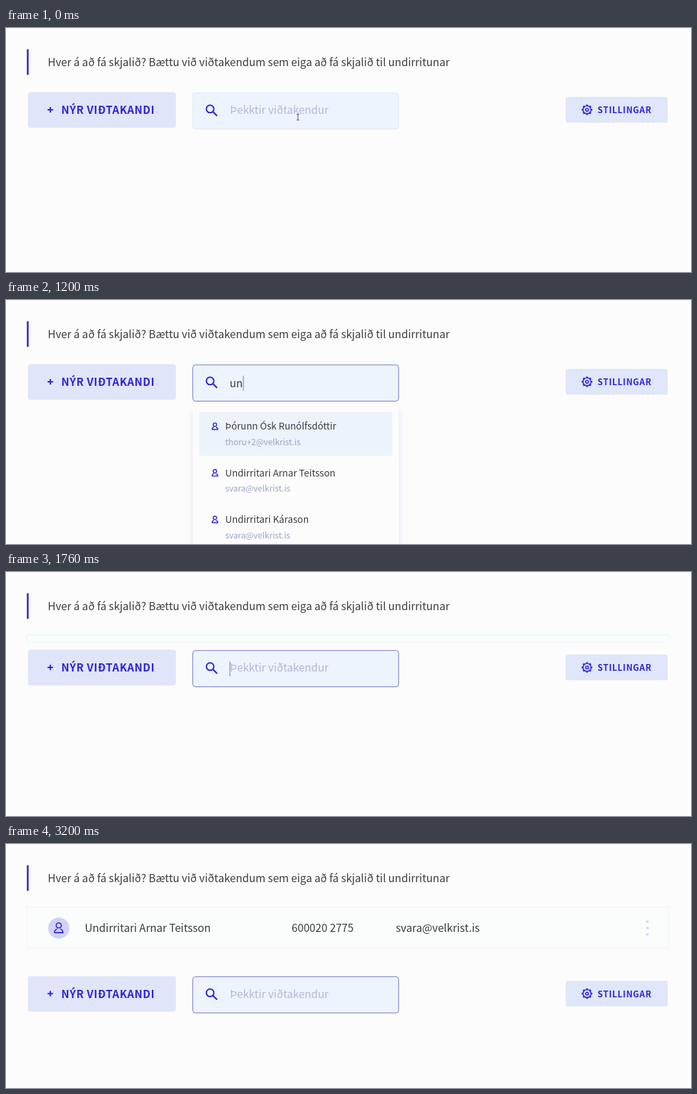
An HTML page for the animation above (3.52 s loop, 1000 px wide and 358 px high).

```html
<!DOCTYPE html>
<html lang="is">
<head>
<meta charset="utf-8">
<title>Viðtakendur</title>
<style>
  html, body { margin: 0; width: 100%; height: 100%; overflow: hidden; background: #fcfcfc; }
  svg { display: block; width: 100vw; height: 100vh; }
  text {
    font: 400 15.68px "Noto Sans CJK JP", "Noto Sans CJK SC", "Noto Sans CJK", "Noto Sans", sans-serif;
    fill: #3c3c40;
    white-space: pre;
  }
  .label { font-size: 15.5px; font-weight: 600; letter-spacing: .64px; fill: #2d22dc; }
  .label.small { font-size: 12.3px; letter-spacing: .73px; }
  .name { font-size: 13.72px; }
  .mail { font-size: 12.15px; fill: #9aa3c8; }
  .hit { font-weight: 700; }
  .line { fill: none; stroke: #2d22dc; }
  .panel { fill: #fcfcfc; filter: drop-shadow(0 5px 5px rgba(80, 100, 200, .17)); }

  /* One shared 3520 ms clock; all changes are hard except the row's fade. */
  .tools, .field, .beam, .hint, .q, .list, .caret, .row, .row-box, .content {
    animation: 3520ms step-end infinite;
  }
  .tools { animation-name: shift; }
  .field { fill: #edf4fd; animation-name: focus; }
  .beam { animation-name: beam; }
  .hint { fill: #b6b5d8; animation-name: hint; }
  .q { opacity: 0; }
  .q1 { animation-name: type1; }
  .q2 { animation-name: type2; }
  .q3 { animation-name: type3; }
  .caret { animation-name: caret; }
  .list { opacity: 0; }
  .wide { animation-name: wide; }
  .short { animation-name: short; }
  .row { animation-name: row; }
  .row-box { animation-name: grow; }
  .content { animation-name: content; }
  .tint { animation: tint 3520ms linear infinite; }
  .dots { animation: dots 3520ms linear infinite; }

  @keyframes shift {
    0% { transform: translateY(0); }
    49.99% { transform: translateY(20px); }
    56.81%, 100% { transform: translateY(99.5px); }
  }
  @keyframes focus {
    0% { stroke: #dfe9f6; }
    4.54% { stroke: #c3caeb; }
    6.81% { stroke: #a4a5de; }
    11.36% { stroke: #8685d4; }
    13.63%, 100% { stroke: #7674ce; }
  }
  @keyframes beam { 0% { opacity: 1; } 27.27%, 100% { opacity: 0; } }
  @keyframes hint { 0% { opacity: 1; } 27.27% { opacity: 0; } 47.72%, 100% { opacity: 1; } }
  @keyframes type1 { 27.27% { opacity: 1; } 31.81%, 100% { opacity: 0; } }
  @keyframes type2 { 31.81% { opacity: 1; } 40.9%, 100% { opacity: 0; } }
  @keyframes type3 { 40.9% { opacity: 1; } 47.72%, 100% { opacity: 0; } }
  @keyframes caret {
    0% { opacity: 0; transform: none; }
    6.81% { opacity: 1; transform: none; }
    20.45% { opacity: 0; transform: none; }
    27.27% { opacity: 1; transform: translateX(10px); }
    31.81% { opacity: 1; transform: translateX(19.6px); }
    40.9% { opacity: 1; transform: translateX(29px); }
    47.72% { opacity: 1; transform: none; }
    63.63% { opacity: 0; transform: none; }
    77.27% { opacity: 1; transform: none; }
    90.9%, 100% { opacity: 0; transform: none; }
  }
  @keyframes wide { 27.27% { opacity: .6; } 31.81% { opacity: 1; } 43.18%, 100% { opacity: 0; } }
  @keyframes short { 0% { opacity: 0; } 43.18% { opacity: 1; } 47.72%, 100% { opacity: 0; } }
  @keyframes row { 0% { opacity: 0; } 49.99%, 100% { opacity: 1; } }
  @keyframes grow { 0% { height: 10.5px; } 56.81%, 100% { height: 60.5px; } }
  @keyframes content { 0% { opacity: 0; } 56.81%, 100% { opacity: 1; } }
  @keyframes tint {
    0%, 50% { fill: #fafdfd; stroke: #e8f5f8; }
    56.81% { fill: #f8fdfd; stroke: #e7f4f8; }
    77%, 100% { fill: #fbfcfc; stroke: #eef3f8; }
  }
  @keyframes dots { 0%, 58% { fill: #d2d1f6; } 77%, 100% { fill: #cddcf5; } }
</style>
</head>
<body>
<svg viewBox="0 0 1000 358" xmlns="http://www.w3.org/2000/svg">
  <defs>
    <g id="person" class="line">
      <circle cy="-2.5" r="2.5"/>
      <path d="M-4.2 4.6 C-4.2 3 -2.8 1.6 -1.6 1.1 M1.6 1.1 C2.8 1.6 4.2 3 4.2 4.6 H-4.2" stroke-linejoin="round"/>
    </g>
  </defs>

  <rect x="30.5" y="31" width="2.5" height="38" rx="1.2" fill="#2d22dc"/>
  <text x="61" y="56">Hver á að fá skjalið? Bættu við viðtakendum sem eiga að fá skjalið til undirritunar</text>

  <g class="row">
    <g class="tint"><rect class="row-box" x="30.5" y="92.5" width="937" height="10.5" rx="2"/></g>
    <g class="content">
      <circle cx="77" cy="123.4" r="15.5" fill="#d0d2fb"/>
      <use href="#person" transform="translate(77 123.2) scale(1.5)" stroke-width="1.05"/>
      <text x="115" y="129.4">Undirritari Arnar Teitsson</text>
      <text x="417" y="129.4">600020 2775</text>
      <text x="569" y="129.4">svara@velkrist.is</text>
      <g class="dots">
        <circle cx="936.3" cy="114" r="2"/>
        <circle cx="936.3" cy="123.3" r="2"/>
        <circle cx="936.3" cy="132.6" r="2"/>
      </g>
    </g>
  </g>

  <g class="tools">
    <rect x="32" y="94" width="216" height="52.5" rx="4" fill="#e1e5fa"/>
    <path class="line" d="M60.7 120 h8 M64.7 116 v8" stroke-width="2"/>
    <text class="label" x="80.8" y="126">NÝR VIÐTAKANDI</text>

    <rect class="field" x="272.7" y="95.2" width="300.5" height="53.2" rx="4"/>
    <circle class="line" cx="298" cy="118.8" r="5.5" stroke-width="2"/>
    <path class="line" d="M302 122.8 L308.2 129" stroke-width="2.2"/>
    <text class="hint" x="327" y="126">Þekktir viðtakendur</text>
    <text class="q q1" x="326.5" y="128">u</text>
    <text class="q q2" x="326.5" y="128">un</text>
    <text class="q q3" x="326.5" y="128">und</text>
    <rect class="caret" x="326.3" y="111" width="1.2" height="22" fill="#8b8ba2"/>

    <rect x="817" y="101" width="149" height="38" rx="3.5" fill="#e0e7fa"/>
    <g class="line" transform="translate(848.2 120)" stroke-width="1.5">
      <circle r="5.8"/>
      <circle r="7" pathLength="16" stroke-dasharray="1 1" stroke-dashoffset=".5"/>
      <circle r="2.1"/>
    </g>
    <text class="label small" x="863.6" y="125">STILLINGAR</text>
  </g>

  <g class="list wide">
    <rect class="panel" x="272.5" y="157" width="301" height="240" rx="5"/>
    <rect x="282" y="164" width="282" height="64.5" rx="3" fill="#ecf3fb"/>
    <g>
      <use href="#person" x="305" y="185.4" stroke-width="1.4"/>
      <text class="name" x="320" y="190.4">Þórunn Ósk Runólfsdóttir</text>
      <text class="mail" x="320" y="213">thoru+2@velkrist.is</text>
    </g>
    <g transform="translate(0 68.4)">
      <use href="#person" x="305" y="185.4" stroke-width="1.4"/>
      <text class="name" x="320" y="190.4">Undirritari Arnar Teitsson</text>
      <text class="mail" x="320" y="213">svara@velkrist.is</text>
    </g>
    <g transform="translate(0 136.8)">
      <use href="#person" x="305" y="185.4" stroke-width="1.4"/>
      <text class="name" x="320" y="190.4">Undirritari Kárason</text>
      <text class="mail" x="320" y="213">svara@velkrist.is</text>
    </g>
  </g>

  <g class="list short">
    <rect class="panel" x="272.5" y="157" width="301" height="149.3" rx="5"/>
    <rect x="282" y="164" width="282" height="64.5" rx="3" fill="#edf3fc"/>
    <g>
      <use href="#person" x="305" y="185.4" stroke-width="1.4"/>
      <text class="name" x="320" y="190.4"><tspan class="hit">Und</tspan>irritari Arnar Teitsson</text>
      <text class="mail" x="320" y="213">svara@velkrist.is</text>
    </g>
    <g transform="translate(0 68.4)">
      <use href="#person" x="305" y="185.4" stroke-width="1.4"/>
      <text class="name" x="320" y="190.4"><tspan class="hit">Und</tspan>irritari Kárason</text>
      <text class="mail" x="320" y="213">svara@velkrist.is</text>
    </g>
  </g>

  <path class="beam" d="M424.3 126.8 H428.1 M426.2 126.8 V135 M424.3 135 H428.1" fill="none" stroke="#55555c" stroke-width="1"/>
</svg>
</body>
</html>
```
